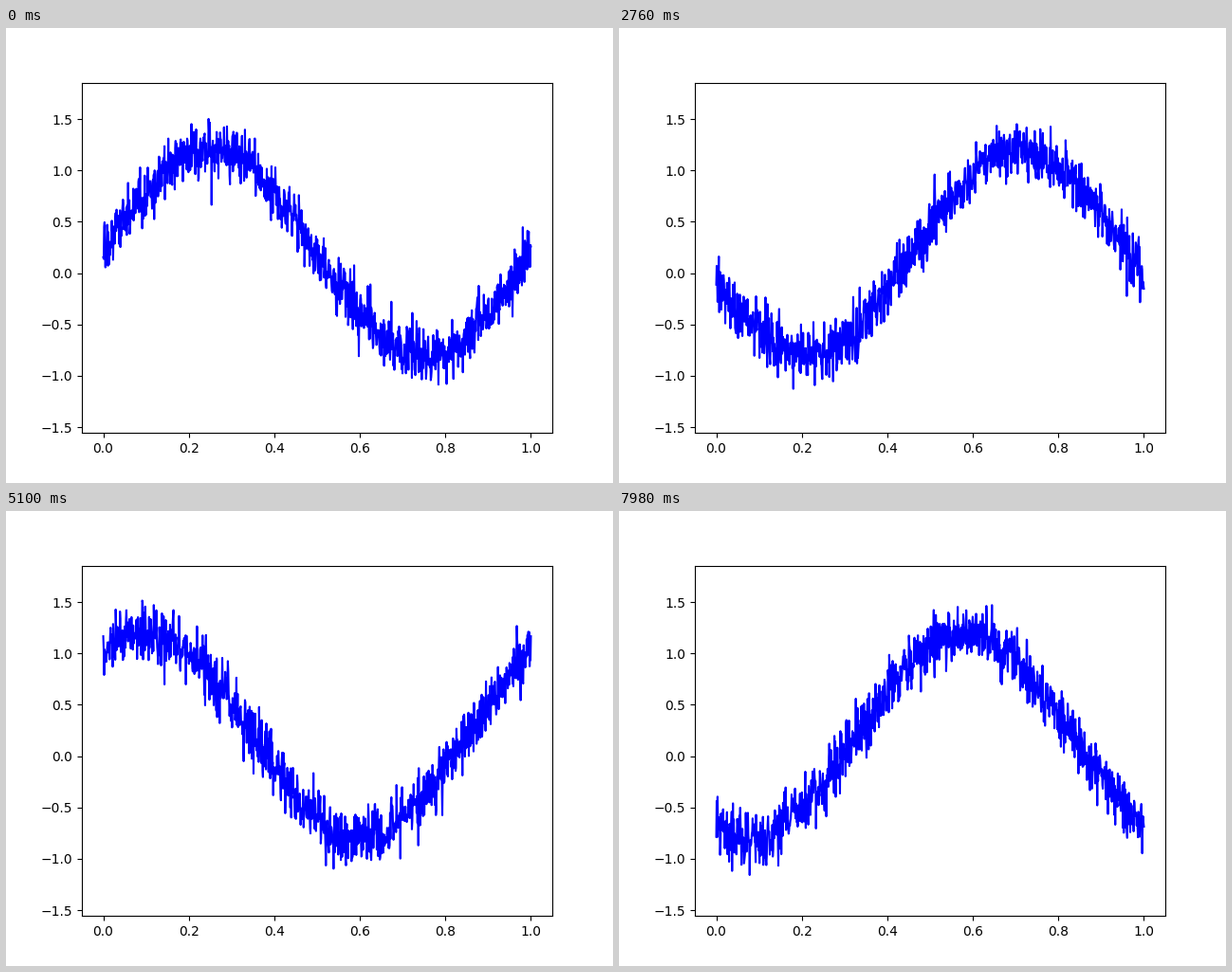
Write a matplotlib script that moves like this. It is 640 by 480 pixels and loops after 8 s.

```python
import numpy as np
import matplotlib.pyplot as plt
from matplotlib.animation import FuncAnimation

TICK = 20       # ms per drawn frame
HOLD = 3        # drawn frames per new sample of the signal
LOOP = 8000     # ms
POINTS = 1000
NOISE = 0.14

x = np.linspace(0, 1, POINTS)


def signal(step):
    """Noisy sine that travels right by 0.01 per step."""
    rng = np.random.default_rng(1000 + step)
    wave = np.sin(2 * np.pi * (x - 0.01 * step))
    return 0.2 + wave + rng.normal(0, NOISE, POINTS)


fig, ax = plt.subplots(figsize=(6.4, 4.8), dpi=100)
ax.set_xlim(-0.05, 1.05)
ax.set_ylim(-1.557, 1.855)
line, = ax.plot(x, signal(0), color="blue", lw=1.5)


def update(frame):
    line.set_ydata(signal(frame // HOLD))
    return line,


anim = FuncAnimation(fig, update, frames=LOOP // TICK, interval=TICK,
                     repeat=True, repeat_delay=0, blit=True)
plt.show()
```
